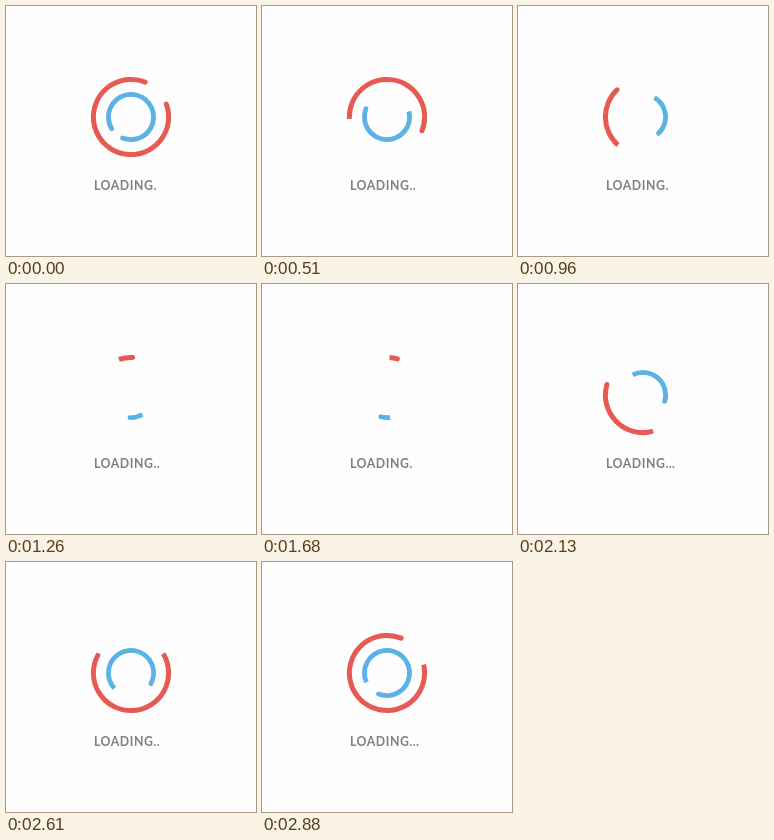
An HTML page for the animation above (2910 ms loop, 250 by 250 pixels).

```html
<!DOCTYPE html>
<html lang="en">
<head>
<meta charset="utf-8">
<title>Loading</title>
<style>
  html, body { margin: 0; width: 100%; height: 100%; overflow: hidden; background: #fefefe; }
  svg { display: block; width: 250px; height: 250px; }
  text { font: 700 12.3px Lato, "Open Sans", sans-serif; letter-spacing: .55px; fill: #808080; }
  #dots { letter-spacing: .3px; }
</style>
</head>
<body>
<svg viewBox="0 0 250 250">
  <path id="outer" fill="#e65a52"/>
  <path id="inner" fill="#5cb1e7"/>
  <text x="87.9" y="183.7">LOADING</text>
  <text id="dots" x="147.6" y="183.7">.</text>
</svg>
<script>
const LOOP = 2910, CX = 125, CY = 111;

// Leading end of the outer ring: time (ms), angle (deg, clockwise from top), speed (deg/ms)
const SPIN = [
  [0, 382, 0], [510, 471, .42], [960, 676, .38], [1330, 725, .04],
  [1560, 732, .03], [1680, 736, .12], [2130, 1005.5, .81],
  [2400, 1231, .79], [2880, 1462, 0], [2910, 1462, 0]
];

const rings = [
  { el: document.getElementById('outer'), r: 37.6, h: 2.5, turn: 0, extra: 0 },
  { el: document.getElementById('inner'), r: 22.6, h: 2.4, turn: 180, extra: 11.5 }
];
const dots = document.getElementById('dots');

function spin(t) {
  let i = 1;
  while (i < SPIN.length - 1 && t > SPIN[i][0]) i++;
  const [t0, a, va] = SPIN[i - 1], [t1, b, vb] = SPIN[i];
  const d = t1 - t0, u = (t - t0) / d, u2 = u * u, u3 = u2 * u;
  return a * (2 * u3 - 3 * u2 + 1) + b * (3 * u2 - 2 * u3)
    + d * (va * (u3 - 2 * u2 + u) + vb * (u3 - u2));
}

// Visible sweep: linear wipe out and back, with a soft minimum
function sweep(t) {
  const x = .244 * Math.abs(t - 1490) - 34.5;
  const soft = x > 80 ? x : 4 * Math.log(1 + Math.exp(x / 4));
  return Math.min(312, soft);
}

function point(r, deg) {
  const a = deg * Math.PI / 180;
  return (CX + r * Math.sin(a)).toFixed(3) + ' ' + (CY - r * Math.cos(a)).toFixed(3);
}

// Band with a round leading end; the trailing end is cut flat unless fully open
function band(r, h, from, to, open) {
  const o = r + h, i = r - h, big = to - from > 180 ? 1 : 0;
  const tail = open ? `A${h} ${h} 0 0 1 ${point(o, from)}` : '';
  return `M${point(o, from)}A${o} ${o} 0 ${big} 1 ${point(o, to)}`
    + `A${h} ${h} 0 0 1 ${point(i, to)}`
    + `A${i} ${i} 0 ${big} 0 ${point(i, from)}${tail}Z`;
}

function draw(t) {
  const end = spin(t), len = sweep(t);
  for (const { el, r, h, turn, extra } of rings) {
    const to = end + turn;
    el.setAttribute('d', band(r, h, to - len - extra, to, len >= 311));
  }
  const step = t < 300 ? 0 : 1 + Math.floor((t - 300) / 250);
  const text = '.'.repeat(step % 3 + 1);
  if (dots.textContent !== text) dots.textContent = text;
}

const start = performance.now();
function tick() {
  draw((performance.now() - start) % LOOP);
  requestAnimationFrame(tick);
}
draw(0);
requestAnimationFrame(tick);
</script>
</body>
</html>
```
